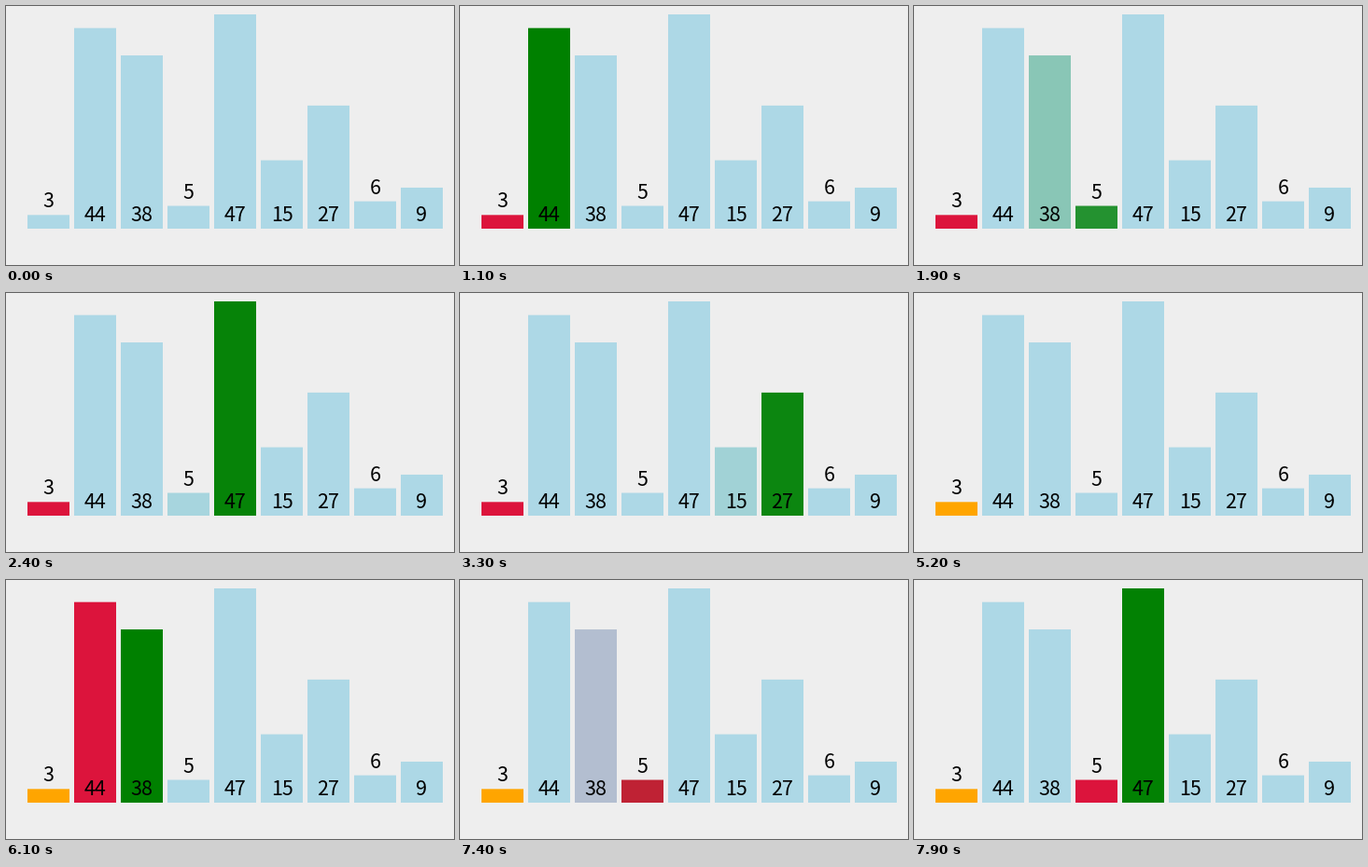
Write a matplotlib script that moves like this. It is 480 px wide and 278 px high and loops after 8 s.

```python
import numpy as np
import matplotlib.pyplot as plt
from matplotlib.animation import FuncAnimation
from matplotlib.colors import to_rgb
from matplotlib.patches import Rectangle

W, H, DPI = 480, 278, 100
TICK, FRAMES = 100, 80
VALUES = [3, 44, 38, 5, 47, 15, 27, 6, 9]
BASE, SCALE = 239, 230 / 47

IDLE, LOOK, LOWEST, DONE = map(
    lambda c: np.array(to_rgb(c)), ("lightblue", "green", "crimson", "orange"))

# Every sorting step fades its colours in FADE ms; steps are PERIOD ms apart.
START, PERIOD, FADE = 372, 457.2, 250
VISIBLE = 0.12


def sort_states():
    """Colours of all bars after each step of a selection sort."""
    vals, colors = list(VALUES), [IDLE] * len(VALUES)
    yield list(colors)
    for i in range(len(vals) - 1):
        low = i
        colors[i] = LOWEST
        yield list(colors)
        for j in range(i + 1, len(vals)):
            colors[j] = LOOK
            if colors[j - 1] is LOOK:
                colors[j - 1] = IDLE
            yield list(colors)
            if vals[j] < vals[low]:
                colors[low], colors[j] = IDLE, LOWEST
                low = j
                yield list(colors)
        if colors[-1] is LOOK:
            colors[-1] = IDLE
            yield list(colors)
        vals[i], vals[low] = vals[low], vals[i]
        colors[low] = IDLE
        colors[i] = DONE
        yield list(colors)


STATES = list(sort_states())


def ease(t):
    t = min(max(t, 0), 1)
    return 4 * t ** 3 if t < 0.5 else 1 - 4 * (1 - t) ** 3


def progress(step, now):
    """Fade of one step at a time; it settles on its second visible tick."""
    begin = START + PERIOD * step
    tick = np.ceil(begin / TICK) * TICK
    while ease((tick - begin) / FADE) < VISIBLE:
        tick += TICK
    if now < tick:
        return 0
    return ease((min(now, tick + TICK) - begin) / FADE)


def colors_at(now):
    step = max(int((now - START) // PERIOD), 0)
    p = progress(step, now)
    if p == 0 and step > 0:
        step -= 1
        p = progress(step, now)
    return [a + (b - a) * p for a, b in zip(STATES[step], STATES[step + 1])]


fig = plt.figure(figsize=(W / DPI, H / DPI), dpi=DPI, facecolor="#eeeeee")
ax = fig.add_axes([0, 0, 1, 1])
ax.set(xlim=(0, W), ylim=(H, 0))
ax.axis("off")

bars = []
for i, v in enumerate(VALUES):
    x, h = 23 + 50 * i, v * SCALE
    bar = Rectangle((x, BASE - h), 45, h, lw=0, color=IDLE, snap=False)
    bars.append(ax.add_patch(bar))
    y = BASE - 8 if h > 40 else BASE - h - 8
    ax.text(x + 22.5, y, str(v), ha="center", va="baseline", color="black",
            family="Noto Sans CJK JP", size=21.5 * 72 / DPI)


def update(frame):
    for bar, color in zip(bars, colors_at(frame * TICK)):
        bar.set_facecolor(color)
    return bars


anim = FuncAnimation(fig, update, frames=FRAMES, interval=TICK,
                     repeat=True, repeat_delay=0)
plt.show()
```
